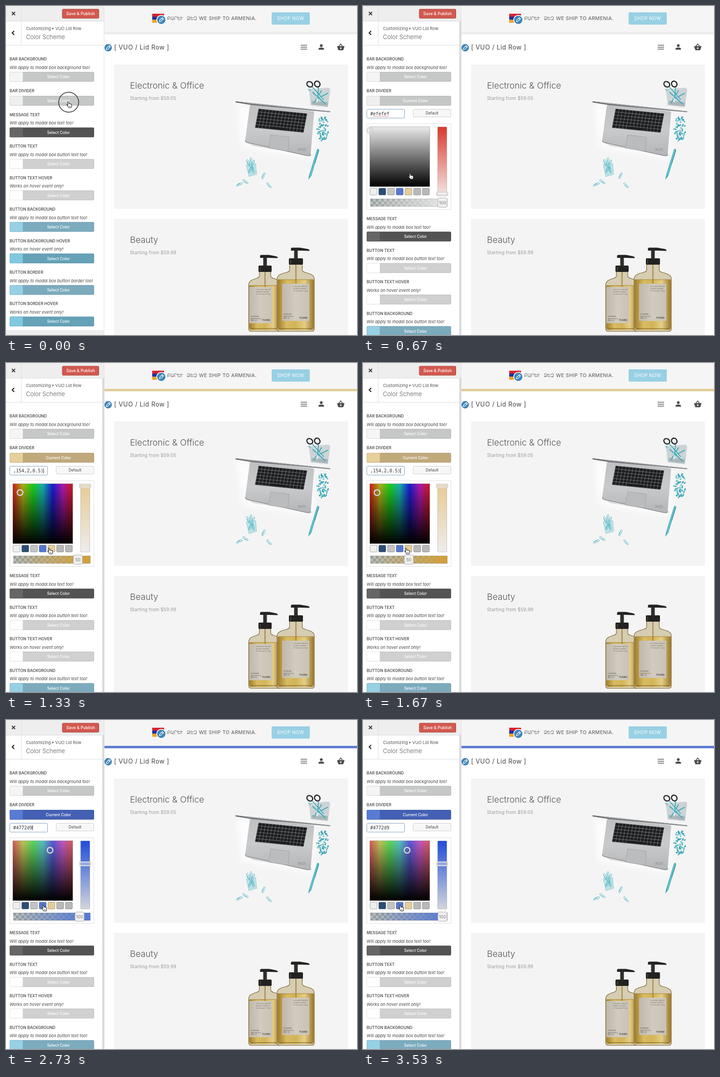
Animation, 773 px wide and 725 px high, one loop 3.59 s. Source, as an HTML page:

```html
<!DOCTYPE html>
<html lang="en">
<head>
<meta charset="utf-8">
<title>Color scheme panel</title>
<style>
html, body { margin: 0; width: 100%; height: 100%; overflow: hidden; background: #fff; }
svg { display: block; width: 773px; height: 725px; font-family: Inter, "Open Sans", sans-serif; }
text { white-space: pre; }
.mono { font-family: "DejaVu Sans Mono", monospace; }
.arm { font-family: "DejaVu Sans", sans-serif; }
.mid { text-anchor: middle; }
</style>
</head>
<body>
<svg id="stage" viewBox="0 0 773 725"></svg>
<script>
const LOOP = 3590, BLINK = 530, SLIDE = 200, SHIFT = 229.5;
const stage = document.getElementById('stage');

const text = (x, y, s, size, fill, more = '') =>
  `<text x="${x}" y="${y}" font-size="${size}" fill="${fill}" ${more}>${s}</text>`;
const rect = (x, y, w, h, fill, more = '') =>
  `<rect x="${x}" y="${y}" width="${w}" height="${h}" fill="${fill}" ${more}/>`;
const path = (d, fill, more = '') => `<path d="${d}" fill="${fill}" ${more}/>`;
const line = (d, stroke, w = 1, more = '') =>
  path(d, 'none', `stroke="${stroke}" stroke-width="${w}" ${more}`);
const ramp = (id, stops, dir = 'x2="0" y2="1"') =>
  `<linearGradient id="${id}" ${dir}>${stops.map(([c, o = 1], i) =>
    `<stop offset="${i / (stops.length - 1)}" stop-color="${c}" stop-opacity="${o}"/>`).join('')}</linearGradient>`;

let seed = 7;
const rnd = () => (seed = seed * 16807 % 2147483647) / 2147483647;

// Secondary hues are dimmer than the primaries.
const hues = [0, 60, 120, 180, 240, 300, 360].map(h => [`hsl(${h},84%,${h % 120 ? 40 : 48}%)`]);
const defs = `<defs>
${ramp('hue', hues, '')}
${ramp('dark', [['#000', .08], ['#000', 1]])}
${ramp('metal', [['#bfc0c2'], ['#c9cacc'], ['#b4b5b7']])}
${ramp('amber', [['#a07c2c'], ['#d8bb62'], ['#d2b458'], ['#e4ce86'], ['#9a772a']], '')}
${ramp('tag', [['#bfb8ac'], ['#d1cbc0'], ['#c9c2b6']], '')}
<linearGradient id="strip" x2="0" y2="1"><stop id="s0"/><stop id="s1" offset="1"/></linearGradient>
<linearGradient id="fade"><stop id="a0" stop-opacity="0"/><stop id="a1" offset="1"/></linearGradient>
<filter id="soft" x="-20%" y="-20%" width="140%" height="140%"><feGaussianBlur stdDeviation="7"/></filter>
<pattern id="check" x="16" y="425" width="12" height="12" patternUnits="userSpaceOnUse">
${rect(0, 0, 12, 12, '#b9bfbd')}${rect(0, 0, 6, 6, '#979e9b')}${rect(6, 6, 6, 6, '#979e9b')}</pattern>
</defs>`;

// ---- settings panel ----
function colorButton(y, swatch, main, label = 'Select Color', id = '') {
  const ids = id ? [`id="${id}Main"`, `id="${id}Swatch"`, `id="${id}Label"`] : ['', '', ''];
  return rect(8, y, 186, 21.5, main, `rx="2.5" ${ids[0]}`) +
    path(`M37 ${y}H10.5Q8 ${y} 8 ${y + 2.5}V${y + 19}Q8 ${y + 21.5} 10.5 ${y + 21.5}H37Z`, swatch, ids[1]) +
    rect(8.5, y + .5, 185, 20.5, 'none', 'rx="2.5" stroke="#000" stroke-opacity=".1"') +
    text(115.5, y + 14, label, 8.6, '#fff', `class="mid" font-weight="500" ${ids[2]}`);
}
const heading = (y, s) => text(8, y + 3.3, s, 8.7, '#555', 'font-weight="600"');
function option(y, title, note, swatch, main) {
  return heading(y, title) + text(8, y + 22, note, 9.23, '#444', 'font-style="italic"') +
    colorButton(y + 28.3, swatch, main);
}
const apply = s => `Will apply to modal box ${s} too!`, hover = 'Works on hover event only!';
const options = [
  ['MESSAGE TEXT', apply('text'), '#666', '#535353'],
  ['BUTTON TEXT', apply('button text'), '#fff', '#d0d0d0'],
  ['BUTTON TEXT HOVER', hover, '#fff', '#d0d0d0'],
  ['BUTTON BACKGROUND', apply('button text'), '#96d0e4', '#7cabbe'],
  ['BUTTON BACKGROUND HOVER', hover, '#80c8e0', '#65a2b7'],
  ['BUTTON BORDER', apply('button border'), '#96d0e4', '#7cabbe'],
  ['BUTTON BORDER HOVER', hover, '#80c8e0', '#65a2b7'],
];
const swatches = ['#efefef', '#2b4f74', '#c4c4c4', '#5577d0', '#e4cd98', '#b8b8b8', '#b8b8b8'];

const picker = `<g id="picker">
${rect(8.5, 227.5, 83, 19.5, '#fff', 'rx="2" stroke="#7d9fbd"')}
${text(16, 241.3, '', 10, '#333', 'class="mono" id="value"')}
${line('M23 243.5H58', '#e0433a', 1.2, 'stroke-dasharray="1.5 1.2" id="spell"')}
${line('M0 232V243', '#222', 1, 'id="caret"')}
${rect(110.5, 227.5, 83, 17, '#f7f7f7', 'rx="2" stroke="#ccc"')}
${text(152, 239, 'Default', 8.3, '#444', 'class="mid"')}
${rect(8.5, 259.5, 185, 189, '#fff', 'stroke="#dfdfdf"')}
${rect(15, 266, 132, 132, 'url(#hue)')}
${rect(15, 266, 132, 132, '#fff', 'id="tint"')}
${rect(15, 266, 132, 132, 'url(#dark)', 'stroke="#777" stroke-opacity=".5"')}
<g id="dot"><circle r="6.3" fill="none" stroke="#999" stroke-width="3.4" stroke-opacity=".5"/>
<circle r="6.3" fill="none" stroke="#e4e4e4" stroke-width="2"/></g>
${swatches.map((c, i) => rect(15.5 + i * 19.2, 401.5, 15.5, 15, c,
    'rx="2" stroke="#000" stroke-opacity=".32"')).join('')}
${rect(164.5, 266.5, 20, 150, 'url(#strip)', 'rx="1.5" stroke="#000" stroke-opacity=".2"')}
<g id="grip">${rect(162.5, -4, 23.5, 8, '#fff', 'fill-opacity=".35" rx="2" stroke="#aaa" stroke-width="2.6"')}
${rect(162.5, -4, 23.5, 8, 'none', 'rx="2" stroke="#f4f4f4" stroke-width="1.4"')}</g>
${rect(16.5, 425, 169, 16.5, 'url(#check)')}
${rect(16.5, 425, 169, 16.5, 'url(#fade)', 'stroke="#000" stroke-opacity=".2"')}
<g id="knob">${rect(-10, 423, 20, 20.5, '#f0f0f0', 'rx="3" stroke="#aaa"')}
${text(0, 437, '', 9.3, '#777', 'class="mid" id="alpha"')}</g>
</g>`;

const panel = rect(0, 0, 216, 725, '#fff') +
  `<g>${heading(117, 'BAR BACKGROUND')}
${text(8, 139, apply('background'), 9.23, '#444', 'font-style="italic"')}
${colorButton(145.3, '#f5f5f5', '#c6c8c8')}
${heading(186.5, 'BAR DIVIDER')}${colorButton(198, '#efefef', '#c5c7c7', 'Select Color', 'divider')}</g>` +
  picker +
  `<g id="rest">${options.map((o, i) => option(239.4 + i * 69.45, ...o)).join('')}
${rect(0, 714, 216, 20, '#eee')}</g>` +
  rect(0, 0, 216, 33, '#eee') + rect(0, 33, 216, 54, '#fff') +
  line('M0 33.5H216M33.5 0V86M0 86.5H216', '#ddd') +
  line('M13 13l7 7M20 13l-7 7', '#333', 2) + line('M18 55l-4.3 4.3 4.3 4.3', '#222', 2.2) +
  rect(124, 7, 80.5, 20, '#d2594f', 'rx="2" stroke="#a9453d"') +
  text(164.3, 20.3, 'Save &amp; Publish', 9, '#fff', 'class="mid" font-weight="500"') +
  text(44, 53, 'Customizing', 9.3, '#555') + path('M102 47.2l3.4 2.4-3.4 2.4z', '#555') +
  text(108.5, 53, 'VUO Lid Row', 9.3, '#555') +
  text(44, 73.3, 'Color Scheme', 13, '#555', 'font-weight="300"') +
  rect(215.5, 0, 1, 725, '#ddd') + rect(212, 33, 4.5, 692, '#dadada', 'id="track"');

// ---- shop preview ----
const editBadge = (x, y, r) => `<g transform="translate(${x} ${y})">
<circle r="${r}" fill="#4086b8" stroke="#fff" stroke-width="1.6"/>
<g transform="rotate(45)">${path('M-1.9-5.2h3.8v8L0 5.8l-1.9-3z', 'none', 'stroke="#fff" stroke-width="1.2"')}
${line('M-1.9-3h3.8', '#fff')}</g></g>`;

const clip = (x, y, a) => `<g transform="translate(${x} ${y}) rotate(${a}) scale(.9)">
${line('M-2 5V-5Q-2-7.5 0-7.5T2-5V6Q2 8 .4 8T-1 6V-3', '#49b5c4', 1)}</g>`;

function keyboard() {
  let keys = '';
  for (let r = 0; r < 6; r++)
    for (let c = 0; c < 14; c++)
      keys += r == 5 && c > 3 && c < 9 ? (c == 4 ? rect(31.6, 35.6, 38, 6, '#1d1e20') : '')
        : rect(1 + c * 7.65, .7 + r * 6.95, 6.9, 6.1, '#1d1e20', 'rx=".8"');
  return `<g transform="matrix(.995 .1 -.19 1 556 226)">${rect(0, 0, 108, 42.5, '#77787b', 'rx="1.5"')}${keys}</g>`;
}

function pins() {
  let s = '';
  for (let i = 0; i < 70; i++) {
    const k = rnd(), x = 698 + (rnd() - .5) * (12 + 16 * Math.sin(Math.PI * k)), y = 245 + k * 52;
    s += `<ellipse cx="${x.toFixed(1)}" cy="${y.toFixed(1)}" rx="2.2" ry="1.4" fill="${i % 3 ? '#57b9c6' : '#2f98a8'}" transform="rotate(${i * 47 % 180} ${x.toFixed(1)} ${y.toFixed(1)})"/>`;
  }
  return s;
}

const desk =
  path('M508 216L540 220 678 234 676 338 520 312z', '#fff', 'filter="url(#soft)" opacity=".75"') +
  path('M529 300L670 331 676 329 545 309z', '#ddd') +
  path('M540 217L677 232Q679 233 678.5 236L671 326Q670 331 664 330L532 301Q526 299 527 294L537 220Z', 'url(#metal)') +
  line('M527 296Q527 300 532 301L664 330Q670 331 671 326', '#8b8c8e', 1.4) +
  path('M505 210L714 232V234L540 218 506 212.5z', '#606265') +
  path('M505 210L714 232 712 233 540 216z', '#a4a6a9') +
  keyboard() +
  path('M583 284L624 289 621 320 578 313z', '#bbbcbe', 'stroke="#9c9da0" stroke-width=".8"') +
  text(643, 318.5, '[K/D]', 7.2, '#85868a') +
  path('M667 183L711 180 714 184 709 223 671 219z', '#c3cbcd', 'opacity=".8"') +
  path('M673 209L709 212 708 221 673 217z', '#aab6b9') +
  line('M684 205L709 192M675 190L704 216M678 214L695 186', '#49afbd', 2.4) +
  line('M674 179L701 209M687 179L685 212', '#e8eef0', 2.6) +
  line('M675 179L700 207M688 180L686 203', '#2d9fb0', 1.8) +
  `<ellipse cx="669" cy="172.5" rx="6.8" ry="5.6" fill="none" stroke="#26282b" stroke-width="2.6" transform="rotate(35 669 172.5)"/>
<ellipse cx="685.5" cy="172" rx="5.8" ry="6.6" fill="none" stroke="#26282b" stroke-width="2.6" transform="rotate(-35 685.5 172)"/>` +
  line('M665 184l5-1M667 187l4-1', '#52b7c5', 1.5) +
  pins() +
  path('M685 316Q688 313 689.5 317L672.5 374 665.5 383 667.5 373z', '#41abba') +
  line('M687 317L670 374', '#88d3dc', 1.3) + line('M689 318L680 347', '#23808e', 1.1) +
  path('M529 350L550 347 552 371 535 376z', '#bfe0e5') +
  [[533, 345, -20], [539, 341, 5], [544, 346, 22], [539, 353, -35], [538, 361, 30], [544, 361, -10],
   [527, 387, -55], [514, 393, 65], [567, 374, 25], [579, 395, -40]].map(c => clip(...c)).join('') +
  line('M529 350L550 347 552 371 535 376z', '#8fc9d1', .8);

const fineText = (x, y, lines, size, gap, more = '') =>
  lines.map((s, i) => text(x, y + i * gap, s, size, '#565149', `class="mono" ${more}`)).join('');

// Bottle: left edge, width, centre of the neck, neck top and width, shoulder height, label box
function bottle(x, w, cx, ny, nw, top, [tx, ty, tw, th]) {
  const r = x + w, nx = cx - nw / 2, nr = cx + nw / 2;
  return path(`M${nx} ${ny}H${nr}V${top - 8}C${nr} ${top} ${r} ${top - 4} ${r} ${top + 12}V711Q${r} 717 ${r - 6} 717H${x + 6}Q${x} 717 ${x} 711V${top + 12}C${x} ${top - 4} ${nx} ${top} ${nx} ${top - 8}Z`, '#d6cdb2', 'stroke="#78602c" stroke-width="1.2"') +
    path(`M${x + 1} ${top + 13}H${r - 1}V709Q${r - 2} 714 ${r - 7} 714H${x + 7}Q${x + 2} 714 ${x + 1} 709Z`, 'url(#amber)') +
    line(`M${x + 2} ${top + 13}H${r - 2}`, '#a77f2b') +
    line(`M${cx} ${ny}V${ty}`, '#a1803a', 3, 'opacity=".7"') +
    line(`M${x + 5} 711H${r - 5}`, '#806020', 2, 'opacity=".6"') +
    rect(tx, ty, tw, th, 'url(#tag)') +
    fineText(tx + tw - 35, ty + 7, ['vondermond', 'underwood', 'slowspring'], 4, 5, 'letter-spacing=".75"') +
    fineText(tx + 3, ty + th - 14, ['handmade', 'apothecary', '500 ml'], 3.8, 4.7) +
    text(tx + tw - 4, ty + th - 5, 'TUVRO', 5.2, '#3d3931', 'text-anchor="end" font-weight="600"');
}
const pump = (cx, y, w, tip) =>
  rect(cx - w / 2, y, w, 14, '#232220', 'rx="2"') +
  rect(cx - 4, y - 17, 8, 18, '#302e2b') +
  path(`M${cx - 11} ${y - 17}V${y - 21}Q${cx - 11} ${y - 23.5} ${cx - 8} ${y - 23.5}H${cx + 9}L${tip - 4} ${y - 20.5}Q${tip} ${y - 20} ${tip} ${y - 16.5}H${tip - 4}L${cx + 9} ${y - 17}Z`, '#252422') +
  line(`M${cx - w / 2 + 4} ${y + 3}v9`, '#55524d', 1.5);

const bottles =
  bottle(534.5, 72, 570.5, 585, 25, 603, [536, 619, 50, 80]) + pump(570.5, 572, 29, 598.5) +
  bottle(597, 82, 638.5, 569, 28, 590, [608, 612, 60, 82]) + pump(638.5, 556, 31, 668.5);

const shop = rect(216, 0, 557, 57, '#f5f5f5') + rect(216, 62, 557, 663, '#fff') +
  rect(216.5, 57, 557, 5.3, '#ececec', 'id="divider"') +
  rect(322, 17, 26, 7, '#d8232f') + rect(322, 23.5, 26, 7, '#1f2f9e') + rect(322, 30, 26, 7, '#efa325') +
  text(355, 31.3, 'ԲԱՐԵՒ', 10, '#666', 'class="arm"') + text(398, 31.3, 'ՁԵԶ', 10, '#666', 'class="arm"') +
  editBadge(342, 30.5, 10) +
  text(425, 31.4, 'WE SHIP TO ARMENIA.', 11, '#555', 'letter-spacing=".35"') +
  rect(585, 14, 84, 27, '#98d0e4', 'rx="2"') +
  text(597, 31.2, 'SHOP NOW', 10, '#fff', 'letter-spacing=".5"') +
  editBadge(225, 92, 9) +
  text(238, 96.3, '[ VUO / Lid Row ]', 13.8, '#444', 'letter-spacing=".55"') +
  line('M649 86.5H663M649 90.7H663M649 94.9H663', '#555', 1.5) +
  `<circle cx="694.3" cy="87.3" r="3" fill="#4a4a4a"/>` +
  path('M688.3 96.3V94.6Q688.3 91.6 694.3 91.6T700.3 94.6V96.3Z', '#4a4a4a') +
  path('M729 88.5H745.5L743 96.5Q742.6 97.5 741.4 97.5H733Q732 97.5 731.6 96.5Z', '#4a4a4a') +
  line('M733 89l4.2-5.5L741.4 89', '#4a4a4a', 1.6) + `<circle cx="737.2" cy="93" r="1.7" fill="#fff"/>` +
  rect(238, 129, 515, 318, '#f4f4f4') + rect(238, 469, 515, 256, '#f4f4f4') +
  [['Electronic &amp; Office', '$59.05', 182], ['Beauty', '$59.99', 522]].map(([name, price, y]) =>
    text(273, y, name, 19.1, '#555', 'font-weight="300"') +
    text(273, y + 25, `Starting from ${price}`, 10, '#999', 'letter-spacing=".2"')).join('') +
  desk + bottles;

const cursor = `<g id="cursor"><circle id="press" cx="-1" cy="-5" r="22" fill="none" stroke="#222" stroke-width="1.4"/>
${path('M-3.5-5.5c.8-1 2-.6 2.3.4l1 3.6c.8-.6 1.6-.4 2 .2.8-.4 1.5-.2 1.8.4.9-.2 1.6.3 1.7 1.2l.2 3-1 3.7h-5.2l-2.6-3.4c-1.2-1.4-2.3-1.8-2-2.7.5-1 1.7-.5 2.6.4z',
  '#fff', 'stroke="#222" stroke-width="1.1" stroke-linejoin="round"')}
${line('M.3 2.5v3M2.2 2.5v3', '#444', .7)}</g>`;

stage.innerHTML = defs + shop + panel + cursor;

// ---- motion ----
const states = [
  { at: 0, open: false, bar: '#ececec', swatch: '#efefef', main: '#c5c7c7' },
  { at: 130, open: true, bar: '#ececec', swatch: '#efefef', main: '#c5c7c7', value: '#efefef', spell: true,
    dot: [16, 274.5], tint: 1, strip: ['#d93a2b', '#f4e6e5'], grip: 414, fade: '#e9e9e9', from: 175, to: 175, alpha: 100 },
  { at: 1267, open: true, bar: '#e4cc97', swatch: '#e6cf9b', main: '#c0aa7c', value: ',154,2,0.5)',
    dot: [31, 285.5], tint: .04, strip: ['#e6cb92', '#efecec'], grip: 271, fade: '#d3a035', from: 175, to: 101, alpha: 50 },
  { at: 2585, open: true, bar: '#5a7bd0', swatch: '#587bd4', main: '#4460b4', value: '#4772d9',
    dot: [97, 287], tint: .33, strip: ['#1f4dd8', '#d3d6dc'], grip: 317, fade: '#5378d6', from: 101, to: 175, alpha: 100 },
];
const moves = [[250, 845, [139, 217], [97, 414]], [1928, 2328, [97, 414], [84, 414]]];
const presses = [[0, 100], [1140, 1267], [2450, 2585]];

const ui = {};
stage.querySelectorAll('[id]').forEach(e => ui[e.id] = e);
const set = (id, k, v) => ui[id].setAttribute(k, v);
const show = (id, on) => set(id, 'visibility', on ? 'inherit' : 'hidden');
const place = (id, x, y) => set(id, 'transform', `translate(${x} ${y})`);
const swing = p => .5 - Math.cos(Math.PI * Math.min(1, Math.max(0, p))) / 2;
let last;

function enter(s) {
  last = s;
  set('divider', 'fill', s.bar);
  set('dividerSwatch', 'fill', s.swatch);
  set('dividerMain', 'fill', s.main);
  ui.dividerLabel.textContent = s.open ? 'Current Color' : 'Select Color';
  show('picker', s.open);
  show('track', s.open);
  place('rest', 0, s.open ? SHIFT : 0);
  show('spell', s.open && s.spell);
  if (!s.open) return;
  ui.value.textContent = s.value;
  place('dot', ...s.dot);
  set('tint', 'opacity', s.tint);
  set('s0', 'stop-color', s.strip[0]);
  set('s1', 'stop-color', s.strip[1]);
  set('a0', 'stop-color', s.fade);
  set('a1', 'stop-color', s.fade);
  place('grip', 0, s.grip);
  place('caret', 16.5 + s.value.length * 6.02, 0);
  ui.alpha.textContent = s.alpha;
}

function draw(now) {
  const t = now % LOOP;
  const s = states.findLast(s => t >= s.at);
  if (s !== last) enter(s);
  if (s.open) {
    const age = t - s.at;
    place('knob', s.from + (s.to - s.from) * swing(age / SLIDE), 0);
    show('caret', age % (2 * BLINK) < BLINK);
  } else show('caret', false);
  const [a, b, p, q] = moves.findLast(m => t >= m[0]) || moves[0];
  const k = swing((t - a) / (b - a));
  place('cursor', p[0] + (q[0] - p[0]) * k, p[1] + (q[1] - p[1]) * k);
  show('press', presses.some(([from, to]) => t >= from && t < to));
}

let start;
function tick(now) {
  start ??= now;
  draw(now - start);
  requestAnimationFrame(tick);
}
draw(0);
requestAnimationFrame(tick);
</script>
</body>
</html>
```
